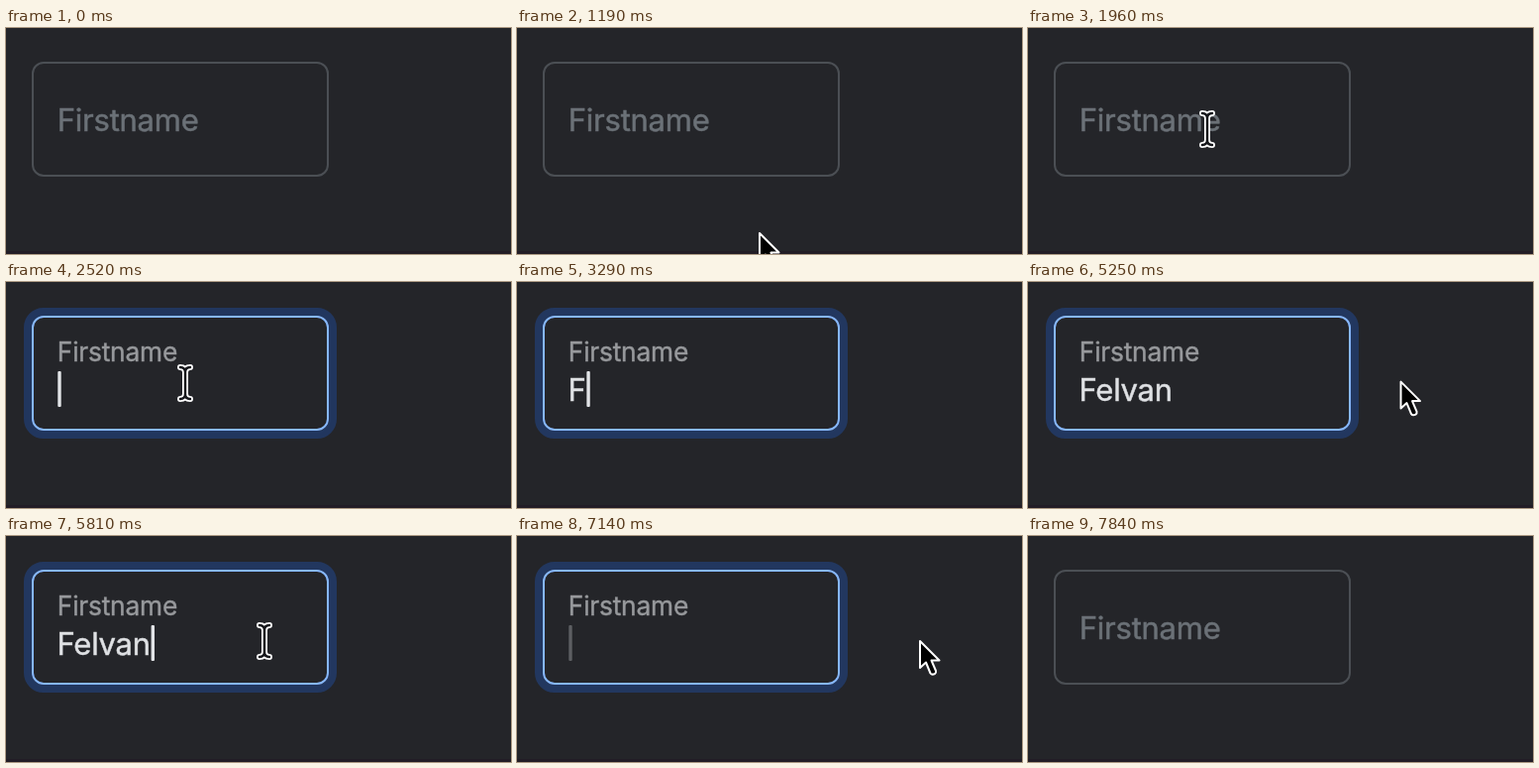
Animation, 510 px wide and 228 px high, one loop 8 s. Source, as an HTML page:

```html
<!DOCTYPE html>
<html lang="en">
<head>
<meta charset="utf-8">
<title>Floating label</title>
<style>
  html, body { margin: 0; width: 100%; height: 100%; overflow: hidden; background: #242529; }
  svg { display: block; width: 100vw; height: 100vh; }
  text {
    font: 400 31px Inter, Roboto, sans-serif; letter-spacing: -.25px;
    fill: currentColor; stroke: currentColor; stroke-width: .5px;
  }
  #value { color: #dfe1e4; }
</style>
</head>
<body>
<svg viewBox="0 0 510 228">
  <rect width="510" height="228" fill="#242529"/>
  <rect y="225" width="510" height="3" fill="#221d26"/>
  <rect id="ring" x="22" y="30" width="308" height="124" rx="16" fill="none" stroke="#22375f" stroke-width="8"/>
  <rect id="box" x="27" y="35" width="298" height="114" rx="11" fill="none" stroke-width="2"/>
  <text id="label">Firstname</text>
  <text id="value" x="51.5" y="120"></text>
  <rect id="caret" y="90" width="3.4" height="36" rx="1" fill="#e2e4e7"/>
  <path id="arrow" fill="#000" stroke="#fff" stroke-width="2" stroke-linejoin="round"
    d="M1 1V28L7 22.5L11.5 33.5Q13 35.5 16 34Q17.5 33 17 31L12.5 20.5H20.5Z"/>
  <g id="beam" fill="none" stroke-linecap="round">
    <path id="stem" d="M-5 -16Q0 -16 0 -11Q0 -16 5 -16M0 -11V11M-5 16Q0 16 0 11Q0 16 5 16"
      stroke="#fff" stroke-width="6"/>
    <path id="core" stroke="#15161a" stroke-width="2.4"/>
  </g>
</svg>
<script>
const LOOP = 8000, STEP = 70, BLINK = 495;
const FOCUS = 2376, BLUR = 7230;
const NAME = 'Felvan';

const el = id => document.getElementById(id);
const [ring, box, label, value, caret, arrow, beam] =
  ['ring', 'box', 'label', 'value', 'caret', 'arrow', 'beam'].map(el);
el('core').setAttribute('d', el('stem').getAttribute('d'));

const clamp = v => Math.min(1, Math.max(0, v));
const smooth = v => v * v * (3 - 2 * v);
const ease = (t, from, dur) => smooth(clamp((t - from) / dur));
const mix = (a, b, k) => a + (b - a) * k;
const mixAll = (a, b, k) => a.map((v, i) => mix(v, b[i], k));
const color = (a, b, k) => `rgb(${mixAll(a, b, k).map(Math.round)})`;

// One key press per letter: a first press, then a steady run
const burst = (first, rest) =>
  [...NAME].map((_, i) => i ? rest + (i - 1) * STEP : first);
const typing = burst(3220, 3425), erasing = burst(6020, 6155);
const countBefore = (times, t) => times.filter(p => p <= t).length;

// 0 = idle, 1 = focused
const focusAt = (t, dur) => ease(t, FOCUS, dur) - ease(t, BLUR, dur);

// Resting places of the pointer
const below = [250, 216], field = [181, 102], right = [458, 95],
  back = [261, 106], side = [406, 105], exit = [352, 160];

// The pointer hides while keys are pressed
function pointerAt(t) {
  const glide = (from, to, a, b) => mixAll(a, b, ease(t, from, to - from));
  const within = (from, to) => t >= from && t < to;
  if (within(1050, typing[0])) return glide(1050, 1820, below, field);
  if (within(4340, 4800)) return glide(4340, 4690, field, right);
  if (within(4800, erasing[0])) return glide(4800, 5810, right, back);
  if (within(6930, 7630)) return glide(6880, 7140, back, side);
  if (within(7630, 7840)) return glide(7630, 7770, side, exit);
  return null;
}

function place(node, show, [x, y]) {
  node.setAttribute('visibility', show ? 'visible' : 'hidden');
  node.setAttribute('transform', `translate(${x} ${y})`);
}

function draw(t) {
  const glow = focusAt(t, 150), lift = focusAt(t, 100);
  ring.setAttribute('opacity', glow);
  box.setAttribute('stroke', color([75, 79, 84], [134, 183, 254], glow));
  label.style.color = color([107, 113, 119], [151, 153, 156], lift);
  label.setAttribute('transform',
    `translate(51.8 ${mix(104, 80, lift)}) scale(${mix(1, .85, lift)})`);

  const text = NAME.slice(0, countBefore(typing, t) - countBefore(erasing, t));
  value.textContent = text;

  // Each press restarts the blink
  const press = Math.max(...[FOCUS, ...typing, ...erasing].filter(p => p <= t));
  const active = t >= FOCUS && t < BLUR;
  const lit = Math.floor((t - press) / BLINK) % 2 === 0;
  caret.setAttribute('opacity', !active ? 0 : lit ? 1 : text ? 0 : .3);
  caret.setAttribute('x', 52.3 + (text ? value.getComputedTextLength() : 0));

  const pos = pointerAt(t);
  const [x, y] = pos || [0, 0];
  const inside = x > 26 && x < 326 && y > 34 && y < 150;
  place(arrow, pos && !inside, [x, y]);
  place(beam, pos && inside, [x, y]);
}

const start = performance.now();
function tick() {
  const t = (performance.now() - start) % LOOP;
  draw(Math.floor(t / STEP) * STEP);
  requestAnimationFrame(tick);
}
tick();
</script>
</body>
</html>
```
